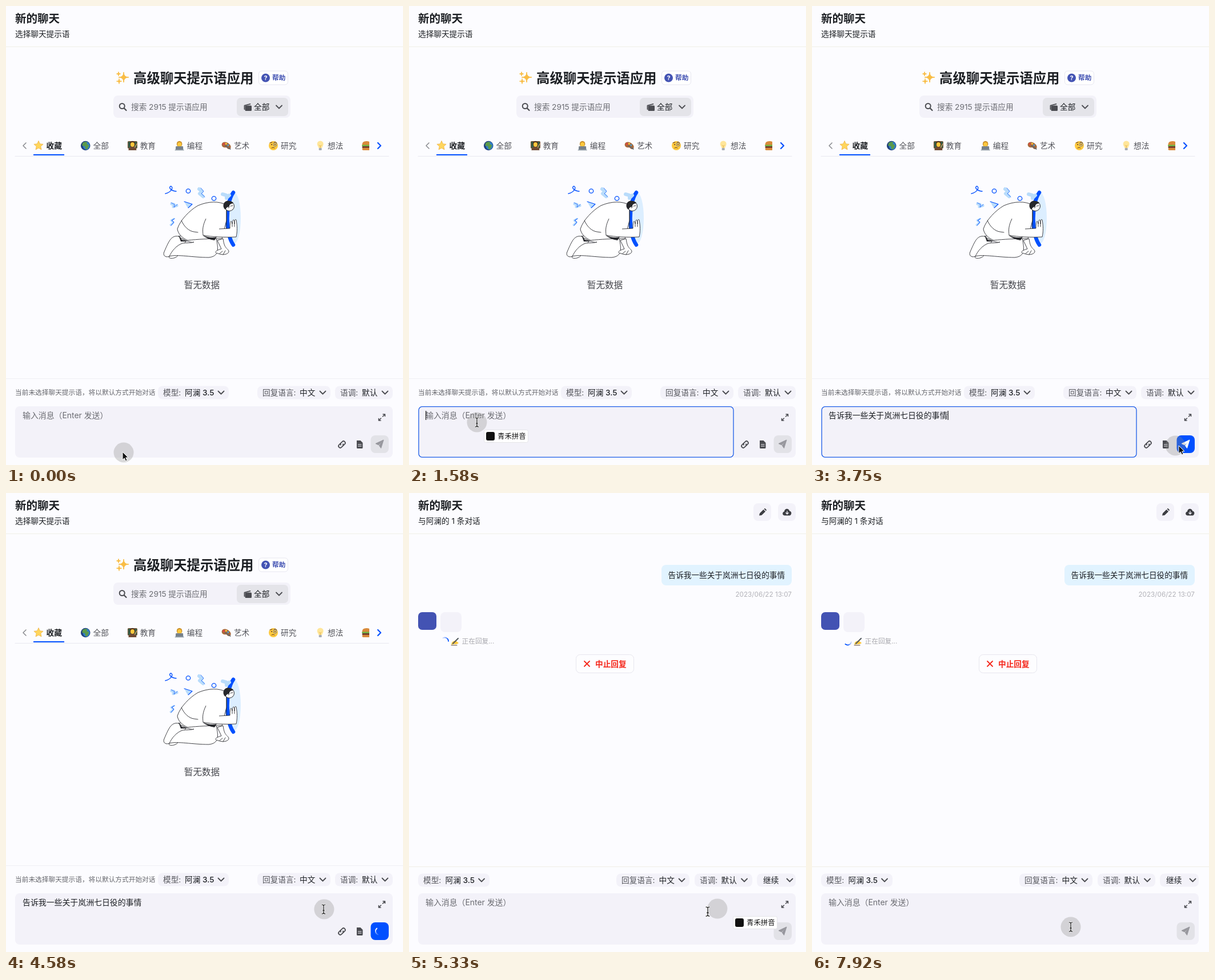
An HTML page that plays this animation: 695 by 805 pixels, repeating every 8 s.

```html
<!DOCTYPE html>
<html lang="zh-CN">
<head>
<meta charset="utf-8">
<title>新的聊天</title>
<style>
html, body { margin: 0; width: 100%; height: 100%; overflow: hidden; background: #fcfcff; }
svg { display: block; }
text { font-family: Inter, "Noto Sans CJK SC", "Noto Sans CJK", sans-serif; white-space: pre; }
.line { fill: none; stroke-linecap: round; stroke-linejoin: round; }
</style>
</head>
<body>
<svg id="stage" width="695" height="805" viewBox="0 0 695 805"></svg>
<script>
const BLUE = '#0050ff', INK = '#1c1f23', GRAY = '#55565c', PALE = '#f3f2f9', INDIGO = '#4353b3', ICON = '#4b4c51';
const QUESTION = '告诉我一些关于岚洲七日役的事情';
const MODEL = '阿澜 3.5';

// Text placed by its left edge and vertical centre
const text = (x, cy, s, size = 13.65, fill = INK, weight = 400, anchor = 'start') =>
  `<text x="${x}" y="${cy + size * .38}" font-size="${size}" fill="${fill}" font-weight="${weight}" text-anchor="${anchor}">${s}</text>`;
const box = (x, y, w, h, r, fill, extra = '') =>
  `<rect x="${x}" y="${y}" width="${w}" height="${h}" rx="${r}" fill="${fill}" ${extra}/>`;
const dot = (x, y, r, fill, extra = '') => `<circle cx="${x}" cy="${y}" r="${r}" fill="${fill}" ${extra}/>`;
const oval = (x, y, rx, ry, fill) => `<ellipse cx="${x}" cy="${y}" rx="${rx}" ry="${ry}" fill="${fill}"/>`;
const fill = (d, color, extra = '') => `<path d="${d}" fill="${color}" ${extra}/>`;
const line = (d, color, w = 1.5, extra = '') =>
  `<path class="line" d="${d}" stroke="${color}" stroke-width="${w}" ${extra}/>`;
const group = (x, y, body, deg = 0) => `<g transform="translate(${x} ${y}) rotate(${deg})">${body}</g>`;
const layer = (id, body) => `<g id="${id}">${body}</g>`;
const chevron = (x, y) => line(`M${x - 5} ${y - 2.5}l5 5l5 -5`, ICON, 1.8);
const pill = (x, cy, w, label, gap, value, chev) =>
  box(x, cy - 11.5, w, 23, 8, PALE) + text(x + 9, cy, label, 13.65, GRAY) +
  text(x + gap, cy, value, 13.65, INK, 500) + chevron(x + chev, cy);

const spark = (x, y, r) =>
  fill(`M${x} ${y - r}Q${x} ${y} ${x + r} ${y}Q${x} ${y} ${x} ${y + r}Q${x} ${y} ${x - r} ${y}Q${x} ${y} ${x} ${y - r}`,
    '#f9bd45', 'stroke="#f9bd45" stroke-width="1" stroke-linejoin="round"');
const starPoints = Array.from({ length: 10 }, (_, i) => {
  const r = i % 2 ? 4 : 8.5, a = i * Math.PI / 5;
  return [r * Math.sin(a), -r * Math.cos(a)].map(v => v.toFixed(1)).join();
}).join(' ');

const person = (shirt, hair) =>
  fill('M-7 8Q-7 1 0 1Q7 1 7 8Z', shirt) + oval(0, -3, 4.8, 5.2, hair) + oval(0, -2, 3.5, 4.1, '#ffc83d');
const icons = {
  star: `<polygon points="${starPoints}" fill="#ffd65c" stroke="#eeb044" stroke-width=".8" stroke-linejoin="round"/>`,
  globe: dot(0, 0, 8.3, '#20427f') + oval(1.5, 0, 6, 7, '#2f7fc9') +
    fill('M-5 -5Q-1 -8 3 -6L2 -3L6 -1Q5 3 3 6L0 6L-1 1L-6 0Z', '#5b9a4a'),
  teacher: box(-8, -7.5, 16, 12, 1, '#35604b', 'stroke="#80502f"') + person('#6f4a33', '#4f3220') + line('M4 3L7.5 -3', '#dfab63', 1.3),
  coder: person('#4c8dca', '#c98f2a') + box(-6.5, 1, 13, 7, 1, '#77818b') + box(-8, 7, 16, 1.5, .5, '#a4adb5'),
  palette: fill('M-8 -3C-6 -8 1 -7 5 -3C9 0 9 6 4 6C1 6 2 3 -1 3C-5 4 -9 1 -8 -3', '#a9683a') +
    dot(-4.5, -3, 1.8, '#e54545') + dot(-.5, -3.5, 1.6, '#ffd03c') + dot(3, -1, 1.6, '#43a6dd') + line('M-2 0L7 6', '#5e6870', 1.6),
  thinker: dot(0, 0, 8, '#ffc93e') + dot(-3, -2, 1, '#5d3922') + dot(3, -2, 3, '#fff2', 'stroke="#737980"') +
    dot(3, -2, 1, '#5d3922') + line('M-6 -5l4 -1M1 -6q3 -2 5 1M-3 4q3 -2 5 0', '#5d3922', 1),
  bulb: fill('M-3 4C-3 2 -5.5 0 -5.5 -3A5.5 5.5 0 0 1 5.5 -3C5.5 0 3 2 3 4Z', '#ffe69a') +
    line('M-2 -1L0 1L2 -1M0 1V4', '#e6ad3e', .9) + box(-2.5, 4, 5, 4, 1, '#a8adb3'),
  burger: fill('M-7.5 -1Q-8 -8 0 -8Q8 -8 7.5 -1Z', '#d98a3b') + box(-8, -1.5, 16, 2.5, 1, '#6fb545') +
    box(-7.5, 1, 15, 3, 1, '#70392b') + box(-7.5, 3.8, 15, 4.2, 2, '#d98a3b'),
  writing: fill('M-7 6L-6 2Q-2 -2 2 0L6 3Q3 6 -2 5Z', '#ffc83d') + line('M-4 4L5 -5', '#525960', 2) + line('M-7 7H3', '#5a4334', 1)
};
const tabs = [['star', '收藏'], ['globe', '全部'], ['teacher', '教育'], ['coder', '编程'], ['palette', '艺术'], ['thinker', '研究'], ['bulb', '想法']];

const halfLink = 'M-.5 -3H-4A3 3 0 0 0 -4 3H-1A3 3 0 0 0 1.9 .8';
const linkIcon = line(halfLink, ICON, 1.8) + group(0, 0, line(halfLink, ICON, 1.8), 180);
const plane = color => fill('M661 761L647 767.5L652 769.8Z M661 761L653.2 770.7L656.5 775.5Z', color,
  `stroke="${color}" stroke-linejoin="round"`);
const spinner = (id, paint) => `<g id="${id}">${line('M-6.1 -2.2A6.5 6.5 0 0 1 5 -4.2', `url(#${paint})`, 1.7)}</g>`;
const fade = (id, color) => `<linearGradient id="${id}" gradientUnits="userSpaceOnUse" x1="-6.5" y1="0" x2="5" y2="0">
  <stop stop-color="${color}" stop-opacity=".15"/><stop offset=".7" stop-color="${color}"/></linearGradient>`;

function illustration() {
  const sketch = d => fill(d, '#fff', 'stroke="#2c2d31" stroke-width=".9" stroke-linejoin="round"');
  const ring = (x, y) => dot(x, y, 3.7, 'none', `stroke="${BLUE}" stroke-width="1.3"`);
  const sky = '#b9dcfb';
  return oval(399, 372, 12, 45, '#dceeff') +
    line('M398 327C384 346 384 400 398 419', BLUE, 6.5) +
    line('M279 329C288 327 294 319 289 316C284 317 287 324 298 325', BLUE, 1.4) +
    ring(319, 324.5) + ring(364, 337.5) +
    line('M338 321L343 325L339 329L345 334', sky, 6) + line('M341 319L346 325L342 329L348 335', BLUE, .7) +
    line('M379 330L386 332L386 337L391 332', sky, 6) +
    line('M290 347L294 348L293 352L299 350', sky, 5) + line('M289 345L295 348L294 353L300 348', BLUE, .7) +
    fill('M312 343L326 348L318 354Z', sky) + line('M312 343L326 347.5L319 354', BLUE, 1.1) +
    line('M294 373L289 376L293 380L288 384', sky, 3) + line('M295 373L290 376L294 379L289 385', BLUE, 1) +
    sketch('M302 404C290 402 286 410 277 431C274 437 279 442 286 439C282 444 298 444 301 437L315 412Z') +
    sketch('M302 404C318 415 328 415 329 414C324 416 316 415 309 416C298 420 290 430 286 439C300 435 326 441 355 441C373 439 372 427 368 407L330 398Z') +
    fill('M302 402L308 410L318 413L306 413Z', '#26272b') +
    sketch('M370 411L377 426C366 429 364 433 371 434L374 435C384 438 393 433 389 428C386 424 382 424 380 408Z') +
    line('M374 434L379 430M380 436L384 429', '#2c2d31', .9) +
    sketch('M386 349C373 342 355 342 336 350C322 358 305 375 300 391C301 399 308 407 318 411C335 409 356 408 378 408L386 376Z') +
    line('M307 376C312 388 321 395 329 396L336 397', '#2c2d31', .9) +
    sketch('M350 373C344 386 344 392 345 402C360 405 382 406 403 405C405 396 405 386 403 375C401 373 400 376 400 382C400 373 397 372 396 382C395 375 392 375 392 390L373 391') +
    line('M396 381V387M400 381V387M386 354V390', '#2c2d31', .9) +
    fill('M344 402Q358 408 369 405L365 411Q352 409 344 402', '#26272b') +
    dot(391, 351, 8.5, '#fff', 'stroke="#2c2d31"') +
    fill('M384 357A8.5 8.5 0 0 1 394 343Q398 344 398 346Q390 347 391 352L387 353Z', '#26272b') +
    line('M393 351L397 350M391 353l-2 1', '#2c2d31', .9);
}

const listPage =
  text(16, 49, '选择聊天提示语') +
  spark(206, 125, 9) + spark(197, 119, 3.5) + spark(198, 132, 4.5) +
  text(223, 126, '高级聊天提示语应用', 23.4, INK, 700) +
  box(442.5, 114, 51, 24, 5, '#fff', 'stroke="#e7e6f0"') + dot(454.5, 126, 7.5, INDIGO) +
  text(454.5, 126, '?', 11, '#fff', 700, 'middle') + text(466, 126, '帮助', 11.7, INDIGO, 600) +
  box(188, 157, 310, 39, 8, PALE) +
  dot(203.2, 175.5, 4.5, 'none', `stroke="${ICON}" stroke-width="2"`) + line('M207 179.5L210.5 183', ICON, 2.2) +
  text(219, 177, '搜索 2915 提示语应用', 13.65, '#6b6c72') +
  box(404, 161, 90, 32, 7, '#e4e4e9') +
  box(418.5, 174.5, 11.5, 9.5, 1.5, ICON) + line('M417.5 181V174.5L427.5 171.8', ICON, 1.8) +
  text(434, 177, '全部', 13.65, INK, 500) + chevron(478, 177) +
  line('M35 240L30 245L35 250', '#8c8d93', 1.6) + line('M651 240L656 245L651 250', BLUE, 2.2) +
  line('M16 263.5H670', '#e9e8f0', 1) + box(48, 260, 54, 2, 0, BLUE) +
  tabs.map(([icon, name], i) => group(57 + i * 82.2, 245, icons[icon]) +
    text(70.5 + i * 82.1, 245, name, 13.65, i ? GRAY : INK, i ? 400 : 700)).join('') +
  `<g clip-path="url(#tabEdge)">${group(631, 245, icons.burger)}</g>` +
  illustration() +
  text(343, 489, '暂无数据', 15.6, '#45464c', 400, 'middle') +
  line('M0 653.5H695', '#f0f0f4', 1) +
  text(16, 678, '当前未选择聊天提示语，将以默认方式开始对话', 11.7, '#66676d') +
  pill(266, 678, 124, '模型:', 47, MODEL, 110.5) +
  pill(440, 678, 128, '回复语言:', 74, '中文', 114.5) +
  pill(576, 678, 101, '语调:', 47, '默认', 87.5);

const messages =
  box(442, 126, 228, 36, 8, '#e1f3ff') + text(453.5, 144, QUESTION) +
  text(670, 177.5, '2023/06/22 13:07', 11.7, '#b2b2b8', 400, 'end') +
  box(16, 209, 32, 31, 7, INDIGO) + box(55, 209, 37, 35, 8, PALE) +
  group(62.5, 260, spinner('replySpin', 'fadeBlue')) + group(81, 260, icons.writing) +
  text(92.5, 260, '正在回复...', 11.7, '#a9a9af') +
  box(292.5, 283.5, 101, 32, 7, '#fdfdff', 'stroke="#e7e6ee"') +
  line('M307 295L316 304M316 295L307 304', '#f5281c', 1.8) + text(326, 299.5, '中止回复', 13.65, '#f5281c', 600);

const chatPage =
  text(16, 49, '与阿澜的 1 条对话') +
  box(603, 18, 31, 31, 8, PALE) + fill('M613 39.5L614 35.5L620.5 29L624 32.5L617.3 39ZM621.5 28L623 26.8L626 29.7L625 31.5Z', '#3c3d42') +
  box(646, 18, 31, 31, 8, PALE) +
  fill('M658 39.5C653 39.5 653 33.5 657 32.5C657.5 26.5 665 26.5 666 31.5C671 31.8 670 39.5 666 39.5Z', '#3c3d42') +
  line('M662 32V36.8M659.8 34.8L662 37L664.2 34.8', PALE, 1.3) +
  line('M0 655.5H695', '#f0efe6', 1.2) +
  pill(16, 679, 125, '模型:', 47.5, MODEL, 111) +
  pill(363, 679, 128, '回复语言:', 74.5, '中文', 114.5) +
  pill(500, 679, 101, '语调:', 46.5, '默认', 87) +
  box(609, 667.5, 68, 23, 8, PALE) + text(620, 679, '继续', 13.65, INK, 500) + chevron(666.5, 679);

const composer =
  box(16, 702, 661, 90, 8, PALE) +
  layer('ring', box(17, 702.7, 551, 88.6, 6, 'none', 'stroke="#1c5de8" stroke-width="1.3"')) +
  layer('hint', text(29, 718, '输入消息（Enter 发送）', 13.9, '#6b6c72')) +
  layer('typed', text(29, 718, QUESTION, 13.9)) +
  line('M659.5 720L663.5 716M660 716H663.5V719.5M656.5 723L652.5 727M652.5 723.5V727H656', ICON, 1.6) +
  layer('tools', group(588, 769, linkIcon, -45) +
    fill('M614 762H620.5L624.5 766V774.5Q624.5 776 623 776H615.5Q614 776 614 774.5Z', ICON) +
    line('M616.5 769H622M616.5 772H622', PALE, 1.1)) +
  layer('sendOff', box(638.5, 753, 31.5, 31, 8, '#e2e2e7') + plane('#97979d')) +
  layer('sendOn', box(638.5, 753, 31.5, 31, 8, BLUE)) +
  layer('sendPlane', plane('#fff')) +
  `<g id="sendWait">${group(653.5, 768.5, spinner('sendSpin', 'fadeWhite'))}</g>`;

const ime = layer('ime', box(.5, .5, 77, 22, 3, '#fff', 'stroke="#e4e4e8"') +
  box(4, 4, 15, 15, 3, '#111') + text(24, 11.5, '青禾拼音', 12.4, '#111', 500));

const mouse =
  layer('halo', dot(0, 0, 17.5, '#888884', 'fill-opacity=".3"')) +
  layer('arrow', fill('M0 0V14L3.3 11L5.5 16L8 15L5.8 10H10Z', '#111', 'stroke="#fff" stroke-width="1"')) +
  layer('beam', ['#fff', '#111'].map((c, i) =>
    line('M-3 -8Q0 -8 0 -6Q0 -8 3 -8M0 -6V6M-3 8Q0 8 0 6Q0 8 3 8M-1.5 2H1.5', c, i ? 1.2 : 2.6)).join(''));

document.getElementById('stage').innerHTML =
  `<defs>${fade('fadeBlue', BLUE)}${fade('fadeWhite', '#fff')}<clipPath id="tabEdge"><rect x="610" y="230" width="26" height="30"/></clipPath></defs>` +
  box(0, 0, 695, 805, 0, '#fcfcff') +
  text(16, 22, '新的聊天', 19.5, INK, 700) + line('M0 71.5H695', '#f0efe6', 1.2) +
  layer('list', listPage) + layer('chat', chatPage) + layer('messages', messages) +
  composer + layer('caret', box(0, 710, 1.2, 16, 0, '#111')) + ime + mouse;

// Pointer path as [time, x, y]; the halo follows it with a short lag
const LOOP = 8000, TICK = 1000 / 12, LAG = 40;
const pointerPath = [
  [-40, 206, 783], [0, 204, 782], [420, 188, 768], [500, 187, 768], [583, 200, 778], [667, 225, 786],
  [750, 258, 774], [833, 260, 760], [917, 200, 745], [1000, 110, 735], [1083, 52, 731], [1167, 70, 730],
  [1250, 70, 730], [1417, 119, 730], [2917, 118, 730], [2960, 147, 721], [3000, 163, 719],
  [3167, 330, 722], [3333, 520, 745], [3417, 583, 767], [3583, 583, 767], [3667, 630, 771], [3833, 654, 771],
  [4417, 654, 771], [4500, 600, 745], [4540, 557, 730], [4583, 556, 730], [5250, 554, 729],
  [5293, 540, 729], [5333, 523, 734], [5500, 505, 765], [5667, 490, 785], [5833, 470, 778],
  [6083, 453, 763], [6250, 453, 761]
];
const replyTurn = [[5250, -10], [5333, 40], [6417, 670], [7917, 1610]];

function at(track, t) {
  const i = track.findIndex(k => k[0] > t);
  if (i < 0) return track.at(-1).slice(1);
  if (!i) return track[0].slice(1);
  const a = track[i - 1], b = track[i], p = (t - a[0]) / (b[0] - a[0]);
  return a.slice(1).map((v, j) => v + (b[j + 1] - v) * p);
}

const $ = id => document.getElementById(id);
const show = (id, on) => { $(id).style.display = on ? '' : 'none'; };
const move = (id, [x, y]) => $(id).setAttribute('transform', `translate(${x} ${y})`);
const turn = (id, deg) => $(id).setAttribute('transform', `rotate(${deg})`);

function draw(time) {
  const t = Math.floor((time + 3.4) / TICK) * TICK;
  const during = (...spans) => spans.some(([a, b]) => t >= a - 4 && t < b - 4);
  const chat = during([4830, LOOP]);
  const typed = during([2500, 4830]), waiting = during([4250, 4830]);

  show('list', !chat);
  show('chat', chat);
  show('messages', during([5250, LOOP]));
  show('tools', !chat);
  show('ring', during([1330, 4250]));
  show('hint', !typed);
  show('typed', typed);
  show('sendOff', !typed);
  show('sendOn', typed);
  show('sendPlane', typed && !waiting);
  show('sendWait', waiting);
  show('caret', during([1330, 1830], [2250, 3170], [3670, 4080]));
  move('caret', [typed ? 237.5 : 29, 0]);
  show('ime', during([1420, 2500], [4830, 5830]));
  move('ime', chat ? [567, 742] : [131, 743]);

  const arrow = during([0, 580], [3670, 4500]);
  show('arrow', arrow);
  show('beam', !arrow);
  move('halo', at(pointerPath, t - LAG));
  move(arrow ? 'arrow' : 'beam', at(pointerPath, t));
  turn('sendSpin', 270 + (t - 4583) * .6);
  turn('replySpin', at(replyTurn, t)[0]);
}

const start = performance.now();
function loop() {
  draw((performance.now() - start) % LOOP);
  requestAnimationFrame(loop);
}
loop();
</script>
</body>
</html>
```
